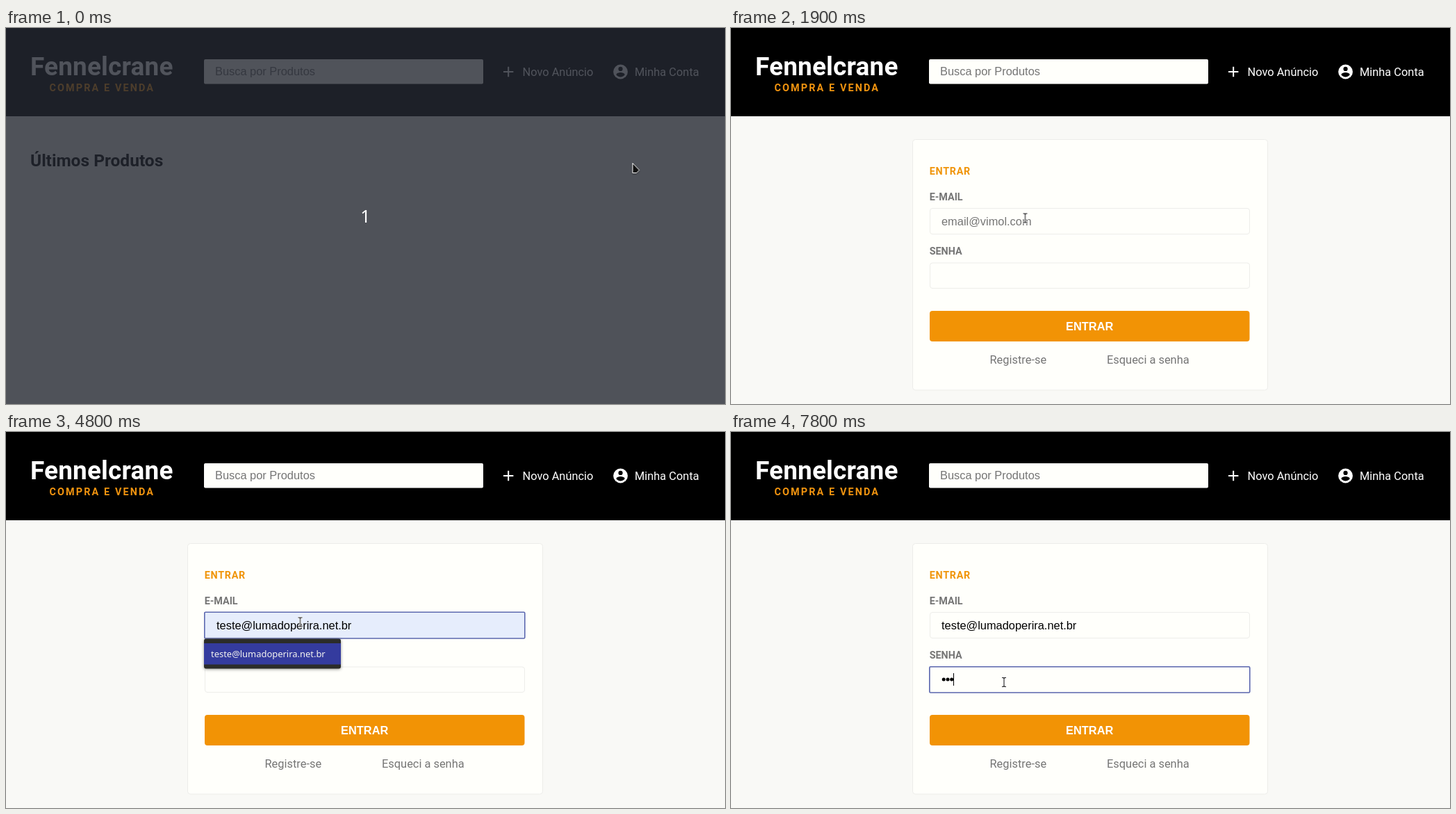
Write an HTML page that moves like this. It is 1035x541 px and loops after 8000 ms.

```html
<!DOCTYPE html>
<html lang="pt-BR">
<head>
<meta charset="utf-8">
<title>Entrar</title>
<style>
html, body { margin: 0; width: 100%; height: 100%; overflow: hidden; background: #f9f9f6; }
svg { display: block; }
text { font: 16.4px Roboto, sans-serif; white-space: pre; }
.arial { font-family: "Liberation Sans", Arial, sans-serif; }
.label { font-size: 14.35px; font-weight: 700; fill: #757575; }
.grey { fill: #757575; }
.menu text { font: 500 12.95px "Noto Sans", sans-serif; fill: #f4f4f0; }
.menu rect { fill: #2b2c29; }
.menu { filter: drop-shadow(0 1px 2px #0006); }
.menu .picked { fill: #343b9e; }
.box { fill: #fffffb; stroke: #ededea; }
.focus { fill: none; stroke: #5c68b0; stroke-width: 1.6; }

/* One loop lasts 8 s, so 1.25% is 100 ms. */
.a { animation: 8s step-end infinite; }

#veil { animation-name: veil; }
@keyframes veil { 0% { visibility: visible } 1.25%, to { visibility: hidden } }
#home { animation-name: home; }
@keyframes home { 0% { visibility: visible } 15%, to { visibility: hidden } }
#login { animation-name: login; }
@keyframes login { 0% { visibility: hidden } 15%, to { visibility: visible } }
#account { animation-name: hover; }
@keyframes hover { 0% { opacity: 1 } 10% { opacity: .8 } 15%, to { opacity: 1 } }

#hint { animation-name: hint; }
@keyframes hint { 0% { visibility: hidden } 15% { visibility: visible } 38.75%, to { visibility: hidden } }
#k1 { animation-name: k1; }
@keyframes k1 { 0% { visibility: hidden } 38.75%, to { visibility: visible } }
#k2 { animation-name: k2; }
@keyframes k2 { 0% { visibility: hidden } 41.25%, to { visibility: visible } }
#k3 { animation-name: k3; }
@keyframes k3 { 0% { visibility: hidden } 52.5%, to { visibility: visible } }
#k4 { animation-name: k4; }
@keyframes k4 { 0% { visibility: hidden } 60%, to { visibility: visible } }
#fill { animation-name: fill; }
@keyframes fill { 0% { visibility: hidden } 60% { visibility: visible } 88.75%, to { visibility: hidden } }
#wave { animation-name: wave; }
@keyframes wave { 0% { visibility: hidden } 65% { visibility: visible } 87.5%, to { visibility: hidden } }
#focus1 { animation-name: focus1; }
@keyframes focus1 { 0% { visibility: hidden } 26.25% { visibility: visible } 87.5%, to { visibility: hidden } }
#focus2 { animation-name: focus2; }
@keyframes focus2 { 0% { visibility: hidden } 87.5%, to { visibility: visible } }

#list { animation-name: list; }
@keyframes list { 0% { visibility: hidden } 26.25% { visibility: visible } 38.75%, to { visibility: hidden } }
#match { animation-name: match; transform-origin: 383px 320px; }
@keyframes match {
  0% { visibility: hidden; opacity: 1; transform: none }
  38.75% { visibility: visible; opacity: 1; transform: none }
  65% { visibility: visible; opacity: .85; transform: scale(.992) }
  66.25% { visibility: visible; opacity: .59; transform: scale(.98) }
  67.5% { visibility: visible; opacity: .28; transform: scale(.97) }
  68.75%, to { visibility: hidden; opacity: 0; transform: scale(.96) }
}
#picked { animation-name: picked; }
@keyframes picked { 0% { opacity: 0 } 60%, to { opacity: 1 } }

#d1 { animation-name: d1; }
@keyframes d1 { 0% { visibility: hidden } 92.5%, to { visibility: visible } }
#d2 { animation-name: d2; }
@keyframes d2 { 0% { visibility: hidden } 95%, to { visibility: visible } }
#d3 { animation-name: d3; }
@keyframes d3 { 0% { visibility: hidden } 97.5%, to { visibility: visible } }

#caret { animation-name: caret; }
@keyframes caret {
  0% { opacity: 0; transform: translate(303px, 269px) }
  26.25% { opacity: 1; transform: translate(303px, 269px) }
  32.5% { opacity: 0; transform: translate(303px, 269px) }
  38.75% { opacity: 1; transform: translate(308px, 269px) }
  41.25% { opacity: 1; transform: translate(317px, 269px) }
  47.5% { opacity: 0; transform: translate(317px, 269px) }
  52.5% { opacity: 1; transform: translate(325px, 269px) }
  60% { opacity: 0; transform: translate(325px, 269px) }
  65% { opacity: 1; transform: translate(497px, 269px) }
  72.5% { opacity: 0; transform: translate(497px, 269px) }
  87.5% { opacity: 1; transform: translate(303px, 347px) }
  92.5% { opacity: 1; transform: translate(309px, 347px) }
  95% { opacity: 1; transform: translate(315px, 347px) }
  97.5%, to { opacity: 1; transform: translate(320px, 347px) }
}

#mouse { animation-name: mouse; }
@keyframes mouse {
  0% { transform: translate(901.5px, 194px) }
  3.75% { transform: translate(911px, 176px) }
  5% { transform: translate(920px, 156px) }
  7.5% { transform: translate(924px, 141px) }
  8.75% { transform: translate(931px, 112px) }
  10% { transform: translate(938px, 76px) }
  11.25% { transform: translate(941px, 70px) }
  12.5% { transform: translate(943px, 67px) }
  17.5% { transform: translate(908px, 83px) }
  18.75% { transform: translate(800px, 134px) }
  20% { transform: translate(648px, 196px) }
  21.25% { transform: translate(520px, 244px) }
  22.5% { transform: translate(440px, 268px) }
  23.75% { transform: translate(423.5px, 273.5px) }
  76.25% { transform: translate(413.5px, 294px) }
  78.75% { transform: translate(398px, 345px) }
  80%, to { transform: translate(393px, 360px) }
}
#arrow { animation-name: arrow; }
@keyframes arrow {
  0% { opacity: 1 } 10% { opacity: 0 } 17.5% { opacity: 1 }
  22.5% { opacity: 0 } 76.25% { opacity: 1 } 78.75%, to { opacity: 0 }
}
#hand { animation-name: hand; }
@keyframes hand { 0% { opacity: 0 } 10% { opacity: 1 } 17.5%, to { opacity: 0 } }
#beam { animation-name: beam; }
@keyframes beam {
  0% { opacity: 0 } 22.5% { opacity: 1 } 76.25% { opacity: 0 } 78.75%, to { opacity: 1 }
}
</style>
</head>
<body>
<svg width="1035" height="541" viewBox="0 0 1035 541">
  <defs>
    <pattern id="zigzag" x="355" y="284" width="4" height="3" patternUnits="userSpaceOnUse">
      <path d="M-1 3L2 .5L5 3" fill="none" stroke="#e0201c"/>
    </pattern>
  </defs>
  <rect width="1035" height="541" fill="#f9f9f6"/>

  <rect width="1035" height="127"/>
  <g fill="#fff">
    <text x="35" y="67.5" style="font-size:36.9px;font-weight:700;letter-spacing:.2px">Fennelcrane</text>
    <text x="62.5" y="91" fill="#f2940f" style="font-size:14.35px;font-weight:700;letter-spacing:2.15px">COMPRA E VENDA</text>
    <rect x="285" y="45" width="402" height="35.5" rx="2" fill="#fffffb"/>
    <text class="arial grey" x="301" y="68">Busca por Produtos</text>
    <path d="M716 63h14.4M723.2 55.8v14.4" stroke="#fff" stroke-width="2"/>
    <text x="743.5" y="69">Novo Anúncio</text>
    <g id="account" class="a">
      <circle cx="884.6" cy="63" r="10.4"/>
      <circle cx="884.6" cy="58.9" r="3.1" fill="#000"/>
      <path d="M878.4 67.1C878.5 65 882.5 63.9 884.6 63.9S890.7 65 890.8 67.1A7.4 7.4 0 0 1 878.4 67.1Z" fill="#000"/>
      <text x="905" y="69">Minha Conta</text>
    </g>
  </g>

  <text id="home" class="a" x="35" y="199" style="font-size:24.5px;font-weight:700">Últimos Produtos</text>

  <g id="login" class="a">
    <rect class="box" x="261.5" y="160.5" width="511" height="360.5" rx="4"/>
    <text class="label" x="285.7" y="210.5" style="fill:#f09408;letter-spacing:.75px">ENTRAR</text>
    <text class="label" x="285.7" y="247.5">E-MAIL</text>
    <rect class="box" x="286.5" y="259.5" width="460" height="37" rx="3.5"/>
    <text class="label" x="285.7" y="326">SENHA</text>
    <rect class="box" x="286.5" y="338" width="460" height="36.5" rx="3.5"/>
    <rect x="286" y="407" width="460.5" height="44" rx="4" fill="#f29305"/>
    <text class="arial" x="516.2" y="434.5" text-anchor="middle" fill="#fff" style="font-weight:700">ENTRAR</text>
    <text class="grey" x="372.5" y="482.5">Registre-se</text>
    <text class="grey" x="541" y="482.5">Esqueci a senha</text>
  </g>

  <rect id="fill" class="a" x="286" y="260" width="460.5" height="36.5" fill="#e6edfc"/>
  <rect id="focus1" class="a focus" x="285.8" y="259.2" width="461" height="37.8" rx="1.5"/>
  <rect id="focus2" class="a focus" x="285.8" y="337.7" width="461" height="37.3" rx="1.5"/>
  <text id="hint" class="a arial grey" x="303" y="283.7">email@vimol.com</text>
  <text class="arial" x="303" y="283.7"><tspan id="k1" class="a">t</tspan><tspan id="k2" class="a">e</tspan><tspan id="k3" class="a">s</tspan><tspan id="k4" class="a">te@lumadoperira.net.br</tspan></text>
  <rect id="wave" class="a" x="355" y="284" width="142" height="3" fill="url(#zigzag)"/>
  <circle id="d1" class="a" cx="306.2" cy="356" r="2.5"/>
  <circle id="d2" class="a" cx="312" cy="356" r="2.5"/>
  <circle id="d3" class="a" cx="317.7" cy="356" r="2.5"/>
  <rect id="caret" class="a" width="1" height="18"/>

  <g id="list" class="a menu">
    <rect x="285" y="297.5" width="219" height="192" rx="3"/>
    <text x="295" y="323.5">teste@lumadoperira.net.br</text>
    <text x="295" y="353.5">loja@lumadoperira.net.br</text>
    <text x="295" y="383.5">contato@lumadoperira.net.br</text>
    <text x="295" y="413.5">vendas@lumadoperira.net.br</text>
    <text x="295" y="443.5">admin@lumadoperira.net.br</text>
    <text x="295" y="473.5">compras@lumadoperira.net.br</text>
  </g>
  <g id="match" class="a menu">
    <rect x="285" y="297.5" width="197" height="43" rx="3"/>
    <rect id="picked" class="a picked" x="285" y="304" width="197" height="30.5"/>
    <text x="295" y="323.5">teste@lumadoperira.net.br</text>
  </g>

  <g id="veil" class="a">
    <rect width="1035" height="541" fill="#252933" fill-opacity=".8"/>
    <text x="517.3" y="280" text-anchor="middle" fill="#fff" style="font:25px 'Noto Sans',sans-serif">1</text>
  </g>

  <g id="mouse" class="a" stroke-linejoin="round">
    <path id="arrow" class="a" d="M.5 .5V14.5H6.2L10 10.4Z" fill="#111" stroke="#fff" style="filter:drop-shadow(0 1px 1px #0006)"/>
    <path id="hand" class="a" d="M0 1.5Q1.3 -.5 2.6 1.5V6L9 7.5Q10.5 8 10.2 10L9 16H1L-4 10Q-4.5 8 -2.5 8.5L0 10Z" fill="#111" stroke="#fff"/>
    <g id="beam" class="a" fill="none">
      <path d="M-3 -6.5H3M-3 6.5H3M0 -6.5V6.5" stroke="#fff" stroke-width="3"/>
      <path d="M-3 -6.5H-1L0 -5.5L1 -6.5H3M-3 6.5H-1L0 5.5L1 6.5H3M0 -5.5V5.5" stroke="#222" stroke-width="1.1"/>
    </g>
  </g>
</svg>
</body>
</html>
```
